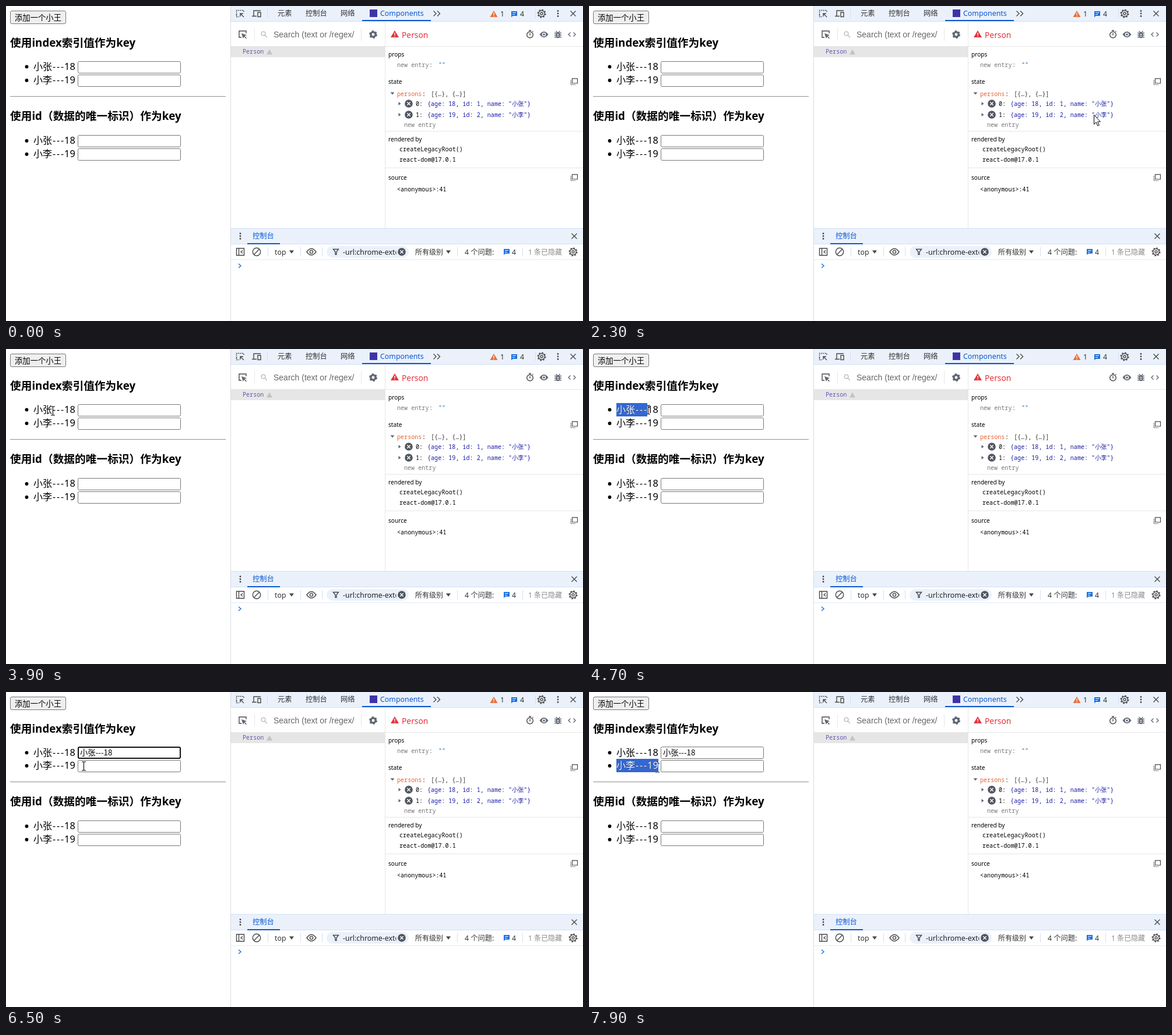
An HTML page for the animation above (8 s loop, 990x542 px).

```html
<!DOCTYPE html>
<html lang="zh">
<head>
<meta charset="utf-8">
<title>Index keys and id keys</title>
<style>
html, body { margin: 0; width: 100%; height: 100%; overflow: hidden; background: #fff; }
svg { display: block; }
text { white-space: pre; }
.page { font-family: "Noto Sans", "Noto Sans CJK SC", "Noto Sans CJK", sans-serif; }
.field { font-family: "Noto Sans CJK SC", "Noto Sans CJK", sans-serif; }
.mono { font-family: "Noto Sans Mono", "Noto Sans CJK SC", "Noto Sans CJK", monospace; }
.arial { font-family: "Liberation Sans", sans-serif; }
.ico { fill: none; stroke: #474747; stroke-width: 1.4; }
.sep { stroke: #d3e0f3; }
.rule { stroke: #e6e6e6; }
.box { fill: #fff; stroke: #767676; }
</style>
</head>
<body>
<svg id="stage" width="990" height="542" viewBox="0 0 990 542"></svg>
<script>
const escapeText = s => s.replace(/&/g, "&amp;").replace(/</g, "&lt;");
const text = (x, y, s, size, fill = "#000", cls = "page", extra = "") =>
  `<text x="${x}" y="${y}" font-size="${size}" fill="${fill}" class="${cls}" ${extra}>${escapeText(s)}</text>`;
const ui = (x, y, s, fill = "#333", size = 12.3) => text(x, y, s, size, fill);
const label = (x, y, s) => text(x, y, s, 10.1);
const mono = (x, y, s, fill = "#000") => text(x, y, s, 10.08, fill, "mono");
const rect = (x, y, w, h, fill, extra = "") =>
  `<rect x="${x}" y="${y}" width="${w}" height="${h}" fill="${fill}" ${extra}/>`;
const path = (d, extra = "") => `<path class="ico" d="${d}" ${extra}/>`;
const solid = (d, fill) => `<path d="${d}" fill="${fill}"/>`;
const hline = (x1, x2, y) => `<path class="rule" d="M${x1} ${y + .5}H${x2}"/>`;
const sep = (x, y) => `<path class="sep" d="M${x + .5} ${y}v16"/>`;
const at = (x, y, body) => `<g transform="translate(${x} ${y})">${body}</g>`;

// Icons are drawn around their centre.
const icons = {
  gear: `<circle class="ico" r="5.2"/><circle class="ico" r="2"/>
    <circle class="ico" r="6.6" style="stroke-width:1.8" stroke-dasharray="2.6 2.6"/>`,
  gearSolid: `<circle r="4.1" fill="none" stroke="#5f6673" stroke-width="3.4"/>
    <circle r="6.1" fill="none" stroke="#5f6673" stroke-width="1.8" stroke-dasharray="3.2 3.2"/>`,
  close: path("M-4.5-4.5 4.5 4.5M4.5-4.5-4.5 4.5"),
  dots: [-4.5, 0, 4.5].map(y => `<circle cy="${y}" r="1.4" fill="#474747"/>`).join(""),
  bubble: solid("M-5-5H5V3H-2.5L-5 5.5Z", "#1a6fe0") +
    path("M-3-2.5H3M-3 .5H1", 'style="stroke:#fff;stroke-width:1.2"'),
  down: solid("M-4-2.5H4L0 3Z", "#474747"),
  inspect: path("M-6.5 2V-5.5H6V-2M-6.5 2V5.5H-2", 'stroke-dasharray="2 1.4"') +
    path("M0 0 6 6M0 5V0H5"),
  pick: path("M-2 5H-6V-6H6V-2") + solid("M-2-2 7 1 3.5 2.7 7 6 5.8 7.2 2.5 3.8.8 7Z", "#5f6673"),
  device: path("M-5 4V-5H7M-8 4.5H0M2-2H7V5.5H2Z"),
  magnifier: path("M1.2 1.2 5 5", 'style="stroke:#bbb"') +
    '<circle cx="-1.5" cy="-1.5" r="3.4" fill="none" stroke="#bbb" stroke-width="1.4"/>',
  watch: '<circle class="ico" cy="1" r="5.3"/>' + path("M-2-6.3H2M0-2V2M4.2-4.2 5.5-5.3"),
  eyeSolid: solid("M-7.5 0Q0-10 7.5 0 0 10-7.5 0Z", "#5f6673") +
    '<circle r="2.6" fill="#5f6673" stroke="#fff" stroke-width="1.5"/>',
  eye: path("M-8 0Q0-11 8 0 0 11-8 0Z") + '<circle class="ico" r="2.6"/>',
  bug: '<ellipse cy="1" rx="3.7" ry="5.3" fill="#5f6673"/>' +
    path("M-6-2.5H6M-6 1H6M-6 4.5H6M-3.5-6-1.5-4M3.5-6 1.5-4", 'style="stroke:#5f6673"') +
    path("M-1.5-.3H1.5M-1.5 2.7H1.5", 'style="stroke:#fff"'),
  code: path("M-2.5-3.5-6 0-2.5 3.5M2.5-3.5 6 0 2.5 3.5", 'style="stroke:#5f6673"'),
  copy: path("M-3.5-5.2H5.5V3H-3.5Z", 'style="stroke-width:1.2"') +
    path("M-5.8-2.5V5.5H3", 'style="stroke-width:1.2" stroke-dasharray="1.6 1.2"'),
  remove: '<circle r="6.8" fill="#50555f"/>' +
    path("M-2.7-2.7 2.7 2.7M2.7-2.7-2.7 2.7", 'style="stroke:#fff"'),
  sidebar: path("M-6.5-6H6.5V6H-6.5ZM-2.5-6V6M4-2.5 1 0 4 2.5"),
  block: '<circle class="ico" r="6.7"/>' + path("M-4.7 4.7 4.7-4.7"),
  funnel: path("M-4.5-4.5H4.5L1 0V4.5H-1V0Z"),
};
const icon = (name, x, y) => at(x, y, icons[name]);

const person = (name, age, y, fill = "#000") =>
  `<text class="page" font-size="16" y="${y}" fill="${fill}"><tspan x="47">${name}</tspan>` +
  `<tspan x="80" letter-spacing="1.8">---</tspan><tspan x="100" font-size="16.4">${age}</tspan></text>`;
const bullet = y => `<circle cx="35.5" cy="${y}" r="2.9"/>`;
const input = (y, id = "") =>
  `<rect ${id && `id="${id}"`} class="box" x="123.5" y="${y + .5}" width="176" height="20" rx="2"/>`;

const page = `
  ${rect(7.5, 8.5, 95, 22, "#efefef", 'stroke="#767676" rx="2.5"')}
  ${text(15, 24.7, "添加一个小王", 13.33)}
  ${text(7, 70, "使用index索引值作为key", 18.72, "#000", "page", 'font-weight="700"')}
  ${bullet(104.5)}
  <g id="first">${input(95, "box1")}${text(127, 110, "小张---18", 13.33, "#000", "field", 'id="pasted"')}</g>
  <g id="lower">
    ${bullet(128)}${input(118)}
    <path d="M7 155.5H377" stroke="#9a9a9a"/><path d="M7 156.5H377" stroke="#eee"/>
    ${text(7, 196, "使用id（数据的唯一标识）作为key", 18.72, "#000", "page", 'font-weight="700"')}
    ${bullet(232)}${person("小张", 18, 237)}${input(222)}
    ${bullet(255)}${person("小李", 19, 260)}${input(245)}
  </g>
  <path id="beam" d="M-3.5-7.5H-1L0-6.5 1-7.5H3.5M0-6.5V6.5M-3.5 7.5H-1L0 6.5 1 7.5H3.5" fill="none" stroke="#000" stroke-width="1.1"/>
  <rect id="mark" x="47" height="23" fill="#3367d1"/>
  <clipPath id="markClip"><rect id="markArea" x="47" height="23"/></clipPath>
  ${person("小张", 18, 110)}
  <g id="second">${person("小李", 19, 133)}</g>
  <g clip-path="url(#markClip)">${person("小张", 18, 110, "#fff")}<g id="secondLit">${person("小李", 19, 133, "#fff")}</g></g>`;

const header = `
  ${rect(386, 0, 604, 26, "#eaf1fb")}${rect(385, 0, 1, 542, "#d5dbe3")}${rect(386, 26, 604, 1, "#d3e0f3")}
  ${icon("inspect", 402, 13)}${icon("device", 430, 13)}${sep(448, 5)}
  ${ui(466, 17.3, "元素")}${ui(514, 17.3, "控制台")}${ui(574, 17.3, "网络")}
  ${rect(624, 6, 13, 13, "#3f33a8")}${ui(642, 17.3, "Components", "#0b57d0", 12.4)}
  ${rect(611, 24, 118, 2, "#0b57d0")}
  ${path("M733.5 8.5 738 13 733.5 17.5M740 8.5 744.5 13 740 17.5")}
  ${solid("M837 8 843.5 19H830.5Z", "#e8703a")}${rect(836.4, 11.5, 1.3, 4, "#fff")}${rect(836.4, 16.5, 1.3, 1.3, "#fff")}
  ${ui(848, 17.5, "1")}${icon("bubble", 872, 14)}${ui(882, 17.5, "4")}${sep(908, 5)}
  ${icon("gear", 919, 13)}${icon("dots", 947, 13)}${icon("close", 973, 13)}`;

const tree = `
  ${hline(386, 990, 69)}<path class="rule" d="M650.5 27V382"/>
  ${icon("pick", 406, 49)}<path class="rule" d="M426.5 38v22M609.5 38v22"/>
  ${icon("magnifier", 443, 49)}${text(459, 54, "Search (text or /regex/", 14, "#666", "arial")}
  ${icon("gearSolid", 630, 49)}
  ${rect(386, 69, 264, 19, "#e6e6e6")}${mono(406, 82, "Person", "#6a51b2")}
  ${solid("M452 74.5 457 83.5H447Z", "#c3c3c3")}`;

const entry = (y, index, value) =>
  solid(`M673.5 ${y - 3}V${y + 3}L677.5 ${y}Z`, "#5f6673") + icon("remove", 691, y) +
  mono(703, y + 4, index + ":") + mono(723, y + 4, value, "#1a1aa6");

const details = `
  ${solid("M667 42 674 54H660Z", "#e5333b")}${rect(666.3, 46, 1.4, 4, "#fff")}${rect(666.3, 51, 1.4, 1.4, "#fff")}
  ${ui(679, 55, "Person", "#e5333b", 13.8)}
  ${icon("watch", 899, 48.5)}${icon("eyeSolid", 923, 49)}${icon("bug", 947, 49)}${icon("code", 971, 49)}
  ${label(656, 87, "props")}${mono(671, 105, "new entry", "#777")}${mono(726, 105, ":", "#555")}${mono(742, 105, '""', "#1565b0")}
  ${label(656, 134, "state")}${icon("copy", 975, 130)}
  ${solid("M659.5 148.5H666.5L663 152.5Z", "#5f6673")}
  ${mono(671, 155, "persons", "#e8602c")}${mono(714, 155, ":")}${mono(729, 155, "[{…}, {…}]", "#333")}
  ${entry(168, 0, '{age: 18, id: 1, name: "小张"}')}
  ${entry(187, 1, '{age: 19, id: 2, name: "小李"}')}
  ${mono(683, 208, "new entry", "#777")}${hline(651, 990, 215)}
  ${label(656, 233, "rendered by")}${mono(675, 250, "createLegacyRoot()")}${mono(675, 268, "react-dom@17.0.1")}
  ${hline(651, 990, 278)}${label(656, 299, "source")}${icon("copy", 975, 295)}
  ${mono(671, 319, "<anonymous>:41")}`;

const drawer = `
  ${rect(386, 382, 604, 27, "#eaf1fb")}${rect(386, 382, 604, 1, "#d3e0f3")}${rect(386, 409, 604, 1, "#d3e0f3")}
  ${icon("dots", 402, 396)}${ui(423, 400.3, "控制台", "#0b57d0")}${rect(414, 408, 56, 2, "#0b57d0")}${icon("close", 975, 396)}
  ${icon("sidebar", 402, 423)}${icon("block", 430, 423)}${sep(449, 415)}
  ${ui(461, 427.5, "top")}${icon("down", 490, 423)}${sep(505, 415)}${icon("eye", 524, 423)}${sep(542, 415)}
  ${rect(550, 413, 141, 20, "#eaf1fb", 'rx="10"')}${icon("funnel", 566, 423)}
  <clipPath id="filterClip"><rect x="576" y="413" width="93.5" height="20"/></clipPath>
  <g clip-path="url(#filterClip)">${ui(578, 427.5, "-url:chrome-extension", "#222", 12.4)}</g>
  ${icon("remove", 679, 423)}
  ${ui(702, 427.5, "所有级别", "#333", 12)}${icon("down", 759, 423)}${sep(774, 415)}
  ${ui(787, 427.5, "4 个问题:", "#333", 12.3)}${icon("bubble", 859, 423)}${ui(868, 427.5, "4")}${sep(886, 415)}
  ${ui(896, 427.5, "1 条已隐藏", "#8a8a8a", 12)}${icon("gear", 973, 423)}
  ${rect(386, 436, 604, 1, "#e1e9f5")}
  ${path("M399 443.5 403 447 399 450.5", 'style="stroke:#1a6fe0"')}`;

document.getElementById("stage").innerHTML = rect(0, 0, 990, 542, "#fff") + page + header + tree + details + drawer +
  '<path id="arrow" d="M0 0V16L3.7 12.5 6.3 18.6 8.8 17.5 6.2 11.6H11Z" fill="#fff" stroke="#000"/>';

const LOOP = 8000, TICK = 100;
// Pointer path: time, x, y
const route = [
  [700, 959, 188], [1200, 748, 176], [1300, 748, 176], [1700, 800, 172], [2200, 884, 179],
  [2300, 866, 187], [2500, 838, 188], [2600, 800, 187], [2700, 773, 190], [3100, 544, 191],
  [3200, 523, 187], [3300, 523, 187], [3400, 505, 195], [3500, 411, 196], [3600, 290, 165],
  [3900, 80, 106], [4200, 50, 104], [4400, 50, 104], [4700, 101, 104], [5100, 118, 104],
  [5200, 118, 104], [6100, 165, 109], [6200, 160, 126], [6300, 160, 126], [7100, 50, 131],
  [7200, 49, 130], [7500, 112, 130], [7800, 112, 130], [7900, 117, 130],
];
// Right edge of the text selection: time, x
const marks = [
  [0, 47], [4500, 63], [4600, 79], [4700, 100], [4800, 109], [4900, 119],
  [6200, 47], [7300, 63], [7400, 93], [7500, 109], [7900, 119],
];
const $ = id => document.getElementById(id);
const set = (id, attrs) => Object.entries(attrs).forEach(([k, v]) => $(id).setAttribute(k, v));
const show = (id, on) => { $(id).style.display = on ? "" : "none"; };

function pointer(t) {
  const i = route.findIndex(p => p[0] > t);
  if (i < 0) return route[route.length - 1].slice(1);
  const [t0, x0, y0] = route[Math.max(0, i - 1)], [t1, x1, y1] = route[i];
  const k = t1 > t0 ? (t - t0) / (t1 - t0) : 0;
  return [x0 + (x1 - x0) * k, y0 + (y1 - y0) * k].map(Math.round);
}

function draw(now) {
  const t = Math.floor((now % LOOP) / TICK) * TICK;
  const [x, y] = pointer(t);
  const spot = `translate(${x + .5} ${y + .5})`;
  const typing = t >= 3900;
  set("arrow", { transform: spot });
  set("beam", { transform: spot });
  show("arrow", t >= 700 && !typing);
  show("beam", typing);

  const pasted = t >= 6400, lift = `translate(0 ${pasted ? -1 : 0})`;
  ["first", "lower", "second", "secondLit"].forEach(id => set(id, { transform: lift }));
  show("pasted", pasted);

  const focus = t >= 6200 && t < 7200, hover = t >= 5700 && t < 6200;
  set("box1", focus
    ? { x: 124, y: 96, width: 175, height: 19, style: "stroke:#101010;stroke-width:2" }
    : { x: 123.5, y: 95.5, width: 176, height: 20, style: hover ? "stroke:#4f4f4f" : "" });

  const edge = marks.filter(m => m[0] <= t).pop()[1];
  const area = { y: t < 6200 ? 93 : 115, width: edge - 47 };
  set("mark", area);
  set("markArea", area);
}

const start = performance.now();
function frame() {
  draw(performance.now() - start);
  requestAnimationFrame(frame);
}
draw(0);
requestAnimationFrame(frame);
</script>
</body>
</html>
```
